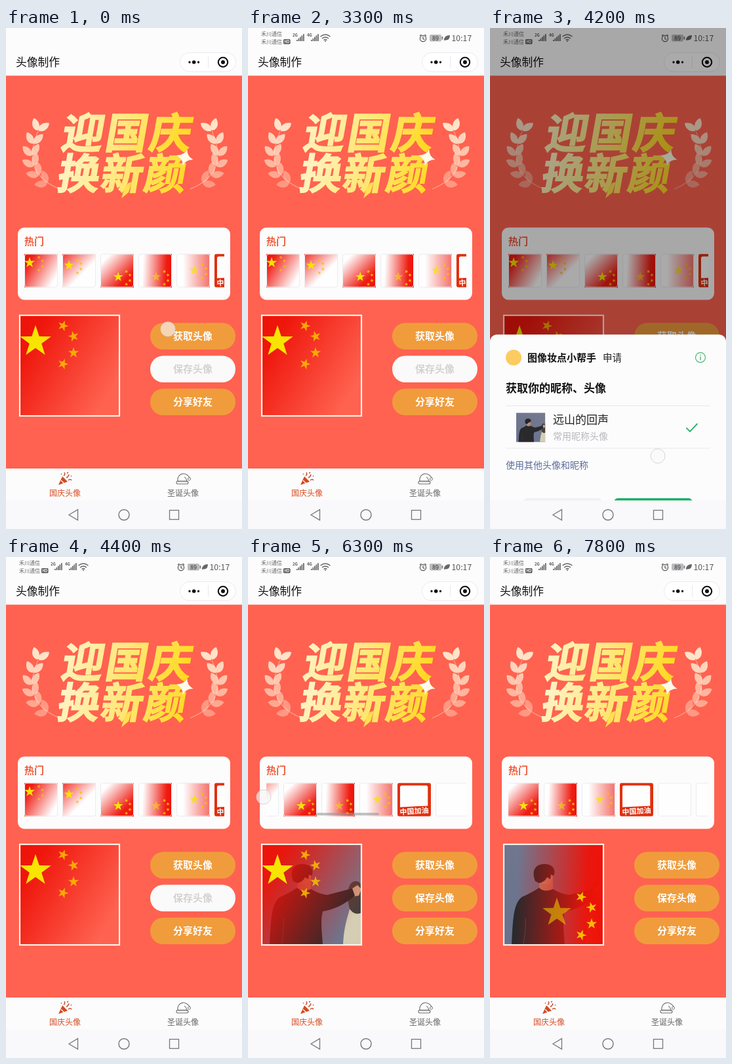
An HTML page that plays this animation: 360x762 px, repeating every 8000 ms.

```html
<!DOCTYPE html>
<html lang="zh-CN">
<head>
<meta charset="utf-8">
<style>
html, body { margin: 0; width: 100%; height: 100%; overflow: hidden; background: #fcfcfc; }
svg { display: block; width: 100vw; height: 100vh; }
text { font-family: "Noto Sans CJK SC", "Noto Sans CJK", "Noto Sans", sans-serif; }
</style>
</head>
<body>
<svg id="stage" viewBox="0 0 360 762" xmlns="http://www.w3.org/2000/svg"></svg>
<script>
const LOOP = 8000;
const STEP = 100;
const CORAL = '#ff6250', AMBER = '#f09c3c', WHITE = '#fcfcfd', RED = '#ee1208';

const rect = (x, y, w, h, fill, r = 0, more = '') =>
  `<rect x="${x}" y="${y}" width="${w}" height="${h}" rx="${r}" fill="${fill}" ${more}/>`;
const circle = (x, y, r, fill, more = '') => `<circle cx="${x}" cy="${y}" r="${r}" fill="${fill}" ${more}/>`;
const path = (d, fill, more = '') => `<path d="${d}" fill="${fill}" ${more}/>`;
const line = (d, color, width, more = '') =>
  path(d, 'none', `stroke="${color}" stroke-width="${width}" ${more}`);
const text = (s, x, y, size, fill, more = '') =>
  `<text x="${x}" y="${y}" font-size="${size}" fill="${fill}" ${more}>${s}</text>`;
const group = (content, more = '') => `<g ${more}>${content}</g>`;
const bold = 'font-weight="700"';
const medium = 'font-weight="500"';
const mid = 'text-anchor="middle"';

function gradient(id, x1, y1, x2, y2, stops, more = '') {
  const list = stops.map(([at, color, alpha = 1]) =>
    `<stop offset="${at}" stop-color="${color}" stop-opacity="${alpha}"/>`).join('');
  return `<linearGradient id="${id}" x1="${x1}" y1="${y1}" x2="${x2}" y2="${y2}" ${more}>${list}</linearGradient>`;
}

function star(x, y, r, fill, turn = 0, alpha = 1) {
  let points = '';
  for (let i = 0; i < 10; i++) {
    const a = (i * 36 - 90 + turn) * Math.PI / 180;
    const d = i % 2 ? r * 0.39 : r;
    points += `${(x + d * Math.cos(a)).toFixed(2)},${(y + d * Math.sin(a)).toFixed(2)} `;
  }
  return `<polygon points="${points}" fill="${fill}" opacity="${alpha}"/>`;
}

// Decorative overlays, each drawn in a 152 x 152 square
function flag(fill, x, y, size, dx, bigAlpha, smallAlpha) {
  const small = [[0, -24, 20], [16, -8, -15], [16, 17, 0], [0, 34, 20]];
  return rect(0, 0, 152, 153, `url(#${fill})`) +
    star(x, y, size, '#f8e400', 0, bigAlpha) +
    small.map(([sx, sy, turn]) => star(x + dx + sx, y + sy, 8.5, '#f8c000', turn, smallAlpha)).join('');
}
const cheer =
  path('M10 0H142Q152 0 152 10V142Q152 152 142 152H10Q0 152 0 142V10Q0 0 10 0ZM20 12Q12 12 12 20V110L138 104V20Q138 12 130 12Z',
    '#e0300f', 'fill-rule="evenodd"') +
  text('中国加油', 76, 140, 33, '#fff', `${bold} ${mid} transform="rotate(-4 76 130)"`);
const overlays = [
  flag('fadeA', 24, 40, 25, 42, 1, 0.85),
  flag('fadeB', 30, 52, 23, 38, 1, 0.9),
  flag('fadeC', 81, 104, 23, 37, 1, 1),
  flag('fadeD', 81, 104, 23, 37, 0.5, 1),
  flag('fadeE', 81, 75, 23, 37, 0.7, 0.9),
  cheer, '', '', '', ''
];

const photo =
  rect(0, 0, 152, 153, 'url(#wall)') +
  path('M124 153C125 130 129 116 132 106L136 92H152V153Z', '#d5ceb4') +
  path('M134 98C128 76 131 57 143 56C150 56 152 62 152 66V104C144 108 138 104 134 98Z', '#45413d') +
  path('M132 71L146 62L152 68L148 78L135 80Z', '#cda384') +
  path('M54 50H75V74H54Z', '#b58a70') +
  path('M52 50C55 60 64 64 72 58L77 44L64 42Z', '#c0957a') +
  path('M48 56C42 40 48 30 62 30C76 30 80 40 76 48L72 46L71 53L66 50Q62 58 54 59Z', '#29272a') +
  path('M12 153C14 116 14 90 28 80Q42 74 54 66Q62 74 75 68Q88 76 100 77L138 67L142 78C126 92 110 99 93 102C89 118 92 134 93 153Z', '#2a292c') +
  line('M33 112Q34 132 30 153', '#403e42', 1.5);

function laurel() {
  const leaf = 'M1 0C5 -8 15 -7 21 0C15 7 5 6 1 0Z';
  const count = 6;
  let leaves = '';
  for (let i = 0; i < count; i++) {
    const t = i / count, u = 1 - t;
    const x = u * u * 49 + 2 * u * t * 21 + t * t * 82;
    const y = u * u * 157 + 2 * u * t * 220 + t * t * 245;
    const heading = Math.atan2(u * -63 - t * 25, u * 28 - t * 61) * 180 / Math.PI;
    for (const side of [-42, 30]) {
      leaves += path(leaf, '#ffead0', `opacity="${(0.95 - i * 0.11).toFixed(2)}" ` +
        `transform="translate(${x.toFixed(1)} ${y.toFixed(1)}) rotate(${(heading + side).toFixed(1)})"`);
    }
  }
  return leaves + line('M49 157Q21 220 82 245', '#ffe2c8', 1.2, 'opacity=".5"');
}

function headline() {
  const row = (s, xs, y) => group(
    text(s, xs, 0, 64, 'url(#gold)', 'font-weight="900" stroke="url(#gold)" stroke-width="1.6"'),
    `transform="translate(0 ${y}) skewX(-10)"`);
  const sparkle = 'M0 -13Q2 -3 13 0Q2 3 0 13Q-2 3 -13 0Q-2 -3 0 -13Z';
  return row('迎国庆', '82 149 216', 183) + row('换新颜', '76 142 208', 245) +
    path('M186 236L192 234L187 250L176 259L180 246Z', '#ffe050') +
    path(sparkle, '#fffaea', 'transform="translate(273 197) rotate(15)"');
}

function signal(x, label) {
  let bars = text(label, x, 13, 6, '#555', bold);
  for (let i = 0; i < 5; i++) bars += rect(x + 6 + i * 2.5, 18 - i * 2.2, 1.7, 2 + i * 2.2, '#666');
  return bars;
}

const statusBar =
  text('禾川通信', 20, 12, 8, '#666') + text('禾川通信', 20, 23.5, 8, '#666') +
  rect(54, 17, 10.5, 7.5, '#555', 1.5) + text('HD', 59.2, 23, 5.5, '#fff', `${bold} ${mid}`) +
  signal(68, '2G') + signal(90, '4G') +
  line('M110.5 13Q118 7 125.5 13M113 16Q118 12 123 16M115.5 18.5Q118 16.5 120.5 18.5', '#666', 1.4) +
  circle(118, 20, 1, '#666') +
  circle(267, 16, 4.6, 'none', 'stroke="#555" stroke-width="1.2"') +
  line('M267 13V16.5L269.5 17.5M262 12L264.5 10M272 12L269.5 10', '#555', 1.2) +
  rect(277, 10, 18, 10.5, '#bbbbbe', 2) + rect(295.5, 13, 1.8, 4.5, '#777') +
  text('89', 286, 18.8, 9, '#333', mid) +
  path('M299 19Q299 11 308 11Q308 19 301 18.5Z', '#666') +
  text('10:17', 310.5, 20, 12.3, '#555');

const header =
  rect(0, 0, 360, 72.5, WHITE) +
  group(statusBar, 'id="status"') +
  text('头像制作', 15, 58, 16.8, '#111', medium) +
  rect(265.5, 37.5, 85, 29, '#fff', 14.5, 'stroke="#ebebf0"') +
  line('M308.5 43V61', '#e9e9ee', 1) +
  circle(280, 52, 1.7, '#111') + circle(286.7, 52, 2.8, '#111') + circle(293.5, 52, 1.7, '#111') +
  circle(331, 52, 7.2, 'none', 'stroke="#111" stroke-width="2.1"') + circle(331, 52, 3, '#111');

const thumbs = overlays.map((art, i) =>
  group(rect(0, 0, 51, 51, '#fefefe', 3) +
    group(art, 'transform="scale(.3355)" clip-path="url(#square)"') +
    (i === 5 ? '' : rect(0.5, 0.5, 50, 50, 'none', 3, 'stroke="#ececf0"')),
    `transform="translate(${28 + i * 58} 343.5)"`)).join('');

const card =
  rect(18, 303.5, 324, 110, WHITE, 10) +
  text('热门', 28, 329.5, 15, '#ee5c3c', bold) +
  group(group(thumbs, 'id="strip"') + rect(0, 389, 96, 4, '#999', 2, 'id="scrollbar"'),
    'clip-path="url(#list)"');

const avatar =
  group(group(photo, 'id="photo"') + group(overlays[0], 'id="first"') + group(overlays[3], 'id="second"'),
    'transform="translate(21 437)" clip-path="url(#square)"') +
  rect(21, 437, 152, 153, 'none', 0, 'stroke="#fff2e8" stroke-width="2.2"');

const button = (label, y, id = '') =>
  rect(220, y, 130, 40.5, AMBER, 20, id && `id="${id}"`) +
  text(label, 285, y + 25, 15, '#fff', `${bold} ${mid} ${id && `id="${id}Label"`}`);

const popper =
  path('M80 695L86 682L94 690Z', '#d24a20') + line('M84 688L89 693', '#fff', 1.2) +
  line('M88 681Q91 679 89 676M92 684Q95 683 96 679M95 688Q98 685 100 688M93 677L95 676M99 682L100 681M84 678L85 679', '#c85030', 1.5);
const hat =
  line('M262 690C261 682 266 677 272 678C277 679 279 682 281 685M262 690H277M272 683Q275 684 276 690', '#777', 1.2) +
  rect(260, 689, 18, 4.5, 'none', 2.2, 'stroke="#777" stroke-width="1.2"') +
  circle(279.5, 686, 2, '#fff', 'stroke="#777"');

const tabs =
  rect(0, 670, 360, 49, WHITE) + popper + hat +
  text('国庆头像', 90, 711.5, 12, '#d84c22', mid) + text('圣诞头像', 270, 711.5, 12, '#666', mid);

const navigation =
  rect(0, 718.5, 360, 44, '#f9f8fa') +
  line('M96 740.5L109.5 732.5V748.5Z', '#777', 1.3) +
  circle(180, 740.5, 8, 'none', 'stroke="#777" stroke-width="1.4"') +
  rect(249.5, 733.5, 14, 14, 'none', 0, 'stroke="#777" stroke-width="1.3"');

const sheet =
  rect(0, 378, 360, 400, WHITE, 11) +
  circle(36, 413, 12, '#fccb62') +
  text('图像妆点小帮手', 57, 418.5, 15, '#111', bold) + text('申请', 172, 418.5, 14.5, '#222') +
  circle(321, 413, 7.5, 'none', 'stroke="#4fb576" stroke-width="1.2"') +
  line('M321 411.5V417M321 408.5V410', '#4fb576', 1.4) +
  text('获取你的昵称、头像', 24, 465.5, 17, '#111', bold) +
  line('M24 486.5H336M24 551H336', '#e8e8ec', 1) +
  group(group(photo, 'transform="scale(.292)" clip-path="url(#square)"'), 'transform="translate(40 497)"') +
  text('远山的回声', 96, 514, 17, '#222') +
  text('常用昵称头像', 96, 537.5, 14, '#b8b8bc') +
  line('M299.5 520L305 525.5L316.5 513.5', '#20b060', 1.8) +
  text('使用其他头像和昵称', 24, 582, 14, '#5c6c98') +
  rect(51, 627, 120, 39.5, '#f0f0f3', 6) + text('拒绝', 111, 653, 17, '#08a45c', `${bold} ${mid}`) +
  rect(189, 627, 120, 39.5, '#08ad5e', 6) + text('允许', 249, 653, 17, '#fff', mid);

const clip = (id, shape) => `<clipPath id="${id}">${shape}</clipPath>`;
const defs = '<defs>' +
  gradient('gold', 85, -50, 275, 10, [[0, '#fff3c4'], [0.45, '#ffe87c'], [1, '#ffd81c']], 'gradientUnits="userSpaceOnUse"') +
  gradient('fadeA', 0, 0, 1, 0.6, [[0, RED], [0.2, RED, 0.95], [1, RED, 0]]) +
  gradient('fadeB', 0, 0, 0.8, 0.8, [[0, RED, 0.85], [0.75, RED, 0]]) +
  gradient('fadeC', 1, 1, 0, 0, [[0, RED], [0.25, RED, 0.95], [0.85, RED, 0]]) +
  gradient('fadeD', 0, 0, 1, 0.05, [[0.15, RED, 0], [0.85, RED, 0.95], [1, RED]]) +
  gradient('fadeE', 0, 0, 1, 0, [[0.2, RED, 0], [1, RED, 0.6]]) +
  gradient('wall', 0, 1, 1, 0, [[0, '#68728e'], [1, '#767a8e']]) +
  clip('square', rect(0, 0, 152, 153, '#000')) +
  clip('list', rect(28, 340, 305, 60, '#000')) + '</defs>';

const stage = document.getElementById('stage');
stage.innerHTML = defs + rect(0, 0, 360, 762, CORAL) + header +
  group(laurel()) + group(laurel(), 'transform="translate(363 0) scale(-1 1)"') + headline() +
  card + avatar +
  button('获取头像', 448.5) + button('保存头像', 498.5, 'save') + button('分享好友', 548.5) + tabs +
  rect(0, 0, 360, 719, '#000', 0, 'id="shade"') + group(sheet, 'id="sheet"') +
  navigation + circle(0, 0, 11, '#f8f4f4', 'id="touch" stroke="#d8d4d8" stroke-width="1"');

const parts = {};
stage.querySelectorAll('[id]').forEach(el => { parts[el.id] = el; });
const set = (id, name, value) => parts[id].setAttribute(name, value);
const show = (id, on) => set(id, 'visibility', on ? 'visible' : 'hidden');
const progress = (t, from, to) => Math.min(1, Math.max(0, (t - from) / (to - from)));
const easeOut = p => 1 - (1 - p) ** 2;

// Finger presence: time span and place
const taps = [
  { from: 0, to: 200, x: 247, y: 458 },
  { from: 3000, to: 3200, x: 247, y: 458 },
  { from: 3900, to: 4300, x: 256, y: 651, alpha: 0.15 },
  { from: 6000, to: 6400, x: 114, y: 365, drag: true },
  { from: 6900, to: 7100, x: 107, y: 368 }
];

function scrollAt(t) {
  return 90 * progress(t, 6000, 6300) + 30 * easeOut(progress(t, 6300, 6700));
}

function render(t) {
  set('status', 'opacity', progress(t, 100, 300));

  const open = easeOut(progress(t, 3300, 3500)) * (1 - progress(t, 4130, 4400));
  set('shade', 'opacity', 0.45 * open);
  set('sheet', 'transform', `translate(0 ${340 * (1 - open)})`);
  show('sheet', open > 0);

  const allowed = t >= 4500;
  const swapped = t >= 7200;
  show('photo', t >= 5000);
  show('first', !swapped);
  show('second', swapped);
  set('save', 'fill', allowed ? AMBER : '#fbfafa');
  set('saveLabel', 'fill', allowed ? '#fff' : '#d4d2d0');

  const scroll = scrollAt(t);
  set('strip', 'transform', `translate(${-scroll} 0)`);
  set('scrollbar', 'x', 76 + scroll * 0.31);
  set('scrollbar', 'opacity', 0.6 * progress(t, 6000, 6080) * (1 - progress(t, 6700, 6850)));

  const tap = taps.find(p => t >= p.from && t < p.to);
  show('touch', tap);
  if (tap) {
    set('touch', 'cx', tap.drag ? Math.max(24, tap.x - scroll) : tap.x);
    set('touch', 'cy', tap.y);
    set('touch', 'fill-opacity', tap.alpha || 0.65);
  }
}

// The picture advances in even steps, like a screen recording
function tick(now) {
  render(Math.floor((now % LOOP) / STEP) * STEP);
  requestAnimationFrame(tick);
}
render(0);
requestAnimationFrame(tick);
</script>
</body>
</html>
```
